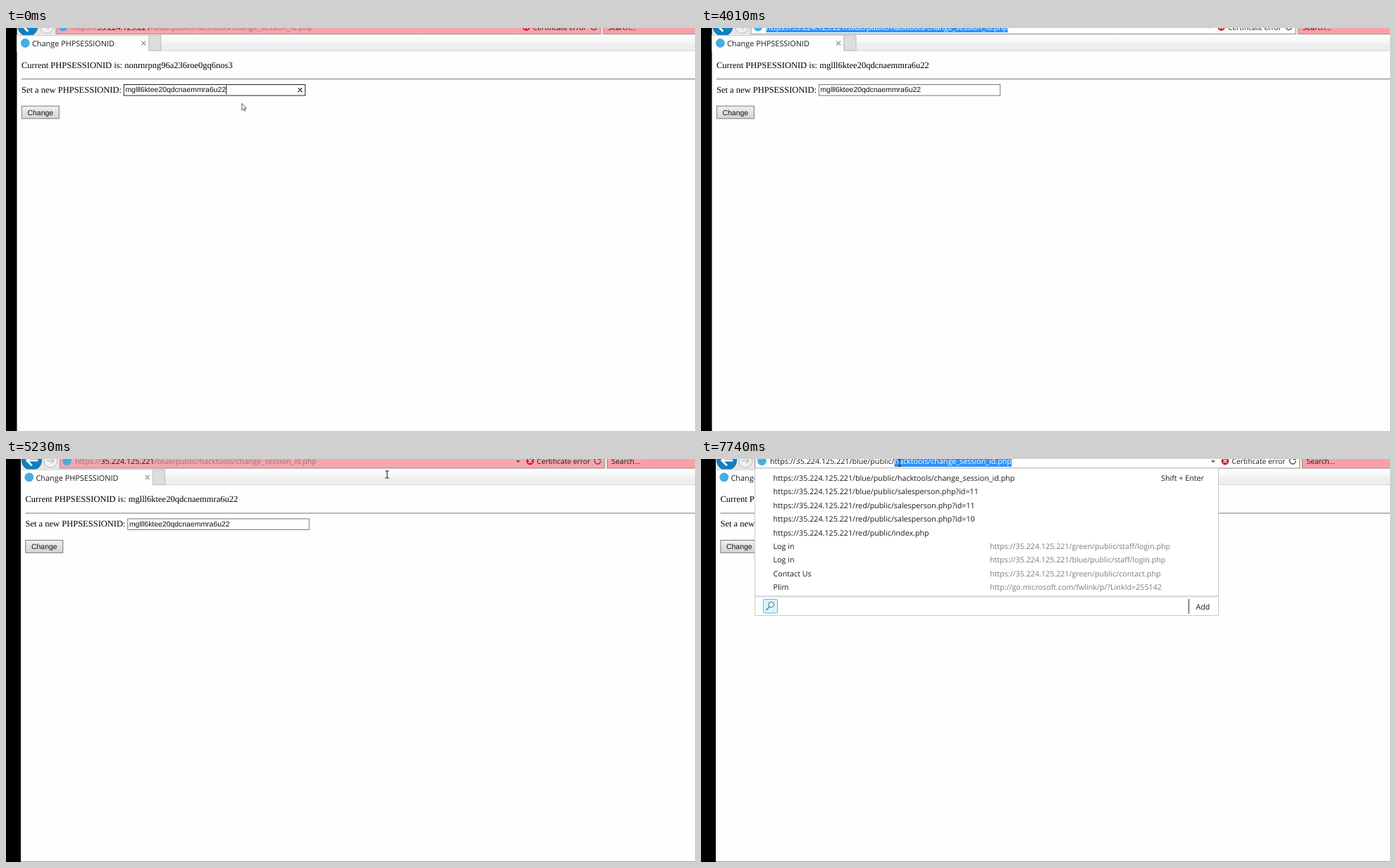
Recreate the animation shown at these times as an HTML page. Size 978x573 px, loop 8000 ms.

```html
<!DOCTYPE html>
<html lang="en">
<head>
<meta charset="utf-8">
<title>Change PHPSESSIONID</title>
<style>
  html, body { margin: 0; width: 100%; height: 100%; overflow: hidden; background: #000; }
  svg { display: block; width: 978px; height: 573px; }
  text { font: 10.72px "Open Sans", "Noto Sans", sans-serif; fill: #1a1a1a; text-rendering: geometricPrecision; white-space: pre; }
  text.serif { font: 12.5px "Liberation Serif", serif; fill: #000; }
  text.field { font: 10.45px "Liberation Sans", sans-serif; fill: #111; }
  text.small { font-size: 10.3px; }
  text.link { fill: #7c7c7c; }
  .dim { fill: #9a7379; }
  .focused .dim { fill: #1a1a1a; }
  .bar { fill: #f7a5af; }
  .focused .bar { fill: #fff; }
  .hidden { display: none; }
  .line { fill: none; stroke-linecap: round; stroke-linejoin: round; }
</style>
</head>
<body>
<svg viewBox="0 0 978 573">
  <defs>
    <linearGradient id="stripFill" x2="0" y2="1">
      <stop offset="0" stop-color="#fdfdfd"/><stop offset=".45" stop-color="#f6f6f6"/>
      <stop offset=".55" stop-color="#efefef"/><stop offset="1" stop-color="#ececec"/>
    </linearGradient>
    <linearGradient id="buttonFill" x2="0" y2="1">
      <stop offset="0" stop-color="#f0f0f0"/><stop offset="1" stop-color="#d4d4d4"/>
    </linearGradient>
    <clipPath id="selectionClip"><rect id="selection" y="13" width="0" height="16"/></clipPath>
  </defs>

  <rect width="978" height="573"/>
  <g id="view">
    <rect x="21" width="1000" height="56" fill="#e6e6e6"/>
    <rect id="strip" x="21" y="32" width="1000" height="23" fill="url(#stripFill)"/>
    <rect x="21" y="55" width="1000" height="600" fill="#fefefe"/>
    <path d="M208 54.8H1000" stroke="#d9d9d9"/>

    <!-- navigation -->
    <circle cx="36.5" cy="20" r="14" fill="#1180c0" stroke="#0b6ba4"/>
    <path class="line" d="M44 20H30M36 13.5L29.5 20L36 26.5" stroke="#fff" stroke-width="2.8"/>
    <circle cx="63.3" cy="20.5" r="9.5" fill="#f1f1f1" stroke="#b9b9b9"/>
    <path class="line" d="M58.5 20.5H68M64.5 17L68 20.5L64.5 24" stroke="#bdbdbd" stroke-width="1.4"/>

    <!-- address bar -->
    <g id="address">
      <rect class="bar" x="76.5" y="10.5" width="773" height="20.5" stroke="#a9888c"/>
      <circle cx="86.5" cy="20.7" r="6.3" fill="#45aee2"/>
      <text x="98" y="25" id="url"><tspan class="dim">https://</tspan>35.224.125.221<tspan class="dim">/blue/public/hacktools/change_session_id.php</tspan></text>
      <g clip-path="url(#selectionClip)">
        <rect x="90" y="13" width="400" height="16" fill="#2f92f7"/>
        <text x="98" y="25" style="fill:#fff">https://35.224.125.221/blue/public/hacktools/change_session_id.php</text>
      </g>
      <path id="urlCaret" d="M441.5 14V29" stroke="#222"/>
      <path d="M724 20h6l-3 3.2z" fill="#555"/>
      <circle cx="744" cy="21" r="5.4" fill="#cf1f2b"/>
      <path class="line" d="M742 19l4 4m0-4l-4 4" stroke="#fff" stroke-width="1.5"/>
      <text class="small" x="753.5" y="25">Certificate error</text>
      <path class="line" d="M843 17.6A4.4 4.4 0 1 0 844.2 21M844 15.5V18.6H841" stroke="#5c4d50" stroke-width="1.4"/>
    </g>
    <rect x="853.5" y="10.5" width="200" height="20.5" fill="#fb9fa9" stroke="#a9888c"/>
    <text class="small" x="859.5" y="25">Search...</text>

    <!-- tab -->
    <path d="M21 33H208.5V56H21z" fill="#fefefe"/>
    <path class="line" d="M21 33H208.5V55" stroke="#c6c6c6"/>
    <rect x="208.5" y="33" width="17" height="21.5" fill="#dddddd" stroke="#bcbcbc"/>
    <circle cx="32.8" cy="44" r="6.4" fill="#45aee2"/>
    <text x="42.5" y="48.6" style="font-size:10.9px">Change PHPSESSIONID</text>
    <path class="line" d="M198 41.5l5.4 5.4m0-5.4l-5.4 5.4" stroke="#8c8c8c" stroke-width="1.1"/>

    <!-- page -->
    <text class="serif" x="27.5" y="79">Current PHPSESSIONID is: <tspan id="current"></tspan></text>
    <rect x="27.5" y="94.5" width="1000" height="1.1" fill="#858085"/>
    <text class="serif" x="27.5" y="114">Set a new PHPSESSIONID:</text>
    <rect id="input" x="172.8" y="103" width="257.4" height="15.5" fill="#fff"/>
    <text class="field" x="174.9" y="113.8">mglll6ktee20qdcnaemmra6u22</text>
    <g id="inputFocus" class="line" stroke="#111">
      <path d="M318.2 104.5V116.5"/>
      <path d="M420.6 108.2l4.8 4.8m0-4.8l-4.8 4.8" stroke-width="1.2"/>
    </g>
    <rect x="27.8" y="133.5" width="53" height="17.8" fill="url(#buttonFill)" stroke="#7a7a7a"/>
    <text class="field" x="36" y="146">Change</text>

    <!-- suggestions -->
    <g id="menu">
      <rect x="76.5" y="31" width="658" height="209.5" fill="#fff" stroke="#c9c9c9"/>
      <g id="rows"></g>
      <text x="653" y="49">Shift + Enter</text>
      <rect x="77" y="212" width="657" height="2.6" fill="#dedede"/>
      <rect x="88.5" y="217.5" width="20" height="19.5" rx="1" fill="#d8f3fc" stroke="#55bcdc"/>
      <circle cx="99.8" cy="225" r="3.7" fill="#eefaff" stroke="#6c7c90" stroke-width="1.2"/>
      <path class="line" d="M97 228l-4 4.5" stroke="#6c7c90" stroke-width="1.7"/>
      <path d="M692.5 217V238" stroke="#333"/>
      <text x="702.5" y="232">Add</text>
    </g>
    <path id="bottomEdge" d="M21 590.4H1000" stroke="#9d9d9d"/>
  </g>

  <path id="arrow" d="M.5 .3V9.8L2.6 7.9L4 11L5.4 10.4L4 7.3H7z" fill="#fff" stroke="#333" stroke-width=".8"/>
  <path id="beam" class="line" d="M-2.2 -5H-.6L0 -4.5L.6 -5H2.2M0 -4.5V4.5M-2.2 5H-.6L0 4.5L.6 5H2.2" stroke="#222" stroke-width="1.1"/>
</svg>

<script>
const LOOP = 8000, URL_LEFT = 98;
const $ = id => document.getElementById(id);
const within = (t, start, end) => t >= start && t < end;
const show = (id, on) => $(id).classList.toggle('hidden', !on);
const place = (id, [x, y]) => $(id).setAttribute('transform', `translate(${x} ${y})`);

// Each entry is [time, x, y], held until the next one.
const arrowPath = [
  [0, 334.3, 107], [120, 216, 145], [430, 130, 150], [550, 75, 134], [690, 57.3, 122],
  [1390, 171, 150], [1510, 265, 222], [1670, 420, 283], [1830, 543, 268], [2000, 537, 180],
  [2160, 510, 92], [2320, 478, 32], [2490, 461, 8.5], [2640, 460.6, 0], [2760, -50, 0]
];
const beamPath = [
  [0, -50, 0], [2760, 463, 2], [3860, 460, 0], [4010, -50, 0], [5170, 541, 22], [5320, 541, 6],
  [6860, 478, 13], [7010, 428, 15], [7160, 358, 12], [7310, 305, 8], [7460, 282, 5.5]
];
const viewPath = [
  [0, -5.5, -22.5], [4440, -3, -11], [4560, 0, 0], [4870, 0, -9], [5020, 0, -18]
];
const at = (path, t) => path.findLast(key => key[0] <= t).slice(1);

const host = 'https://35.224.125.221/';
const suggestions = [
  [host + 'blue/public/hacktools/change_session_id.php'],
  [host + 'blue/public/salesperson.php?id=11'],
  [host + 'red/public/salesperson.php?id=11'],
  [host + 'red/public/salesperson.php?id=10'],
  [host + 'red/public/index.php'],
  ['Log in', host + 'green/public/staff/login.php'],
  ['Log in', host + 'blue/public/staff/login.php'],
  ['Contact Us', host + 'green/public/contact.php'],
  ['Plim', 'http://go.microsoft.com/fwlink/p/?LinkId=255142']
];
$('rows').innerHTML = suggestions.map(([label, link = ''], i) => {
  const y = 49 + 19.38 * i;
  return `<text x="102.5" y="${y}">${label}</text><text class="link" x="410" y="${y}">${link}</text>`;
}).join('');

const prefixLength = (host + 'blue/public/').length;

function selectionStart(t, end) {
  if (within(t, 2900, 4440) || within(t, 5320, 6020)) return URL_LEFT;
  if (t >= 7460) return URL_LEFT + $('url').getSubStringLength(0, prefixLength);
  if (t >= 6860) return Math.min(end, at(beamPath, t)[0]);
  return end;
}

function draw(t) {
  place('view', at(viewPath, t));
  place('arrow', at(arrowPath, t));
  place('beam', at(beamPath, t));

  const editing = t < 820;
  show('inputFocus', editing);
  $('input').setAttribute('stroke', editing ? '#222' : '#777');
  $('current').textContent = t < 1100 ? 'nonrnrpng96a236roe0gq6nos3' : 'mglll6ktee20qdcnaemmra6u22';

  $('address').classList.toggle('focused', within(t, 2900, 4440) || t >= 5320);
  const end = URL_LEFT + $('url').getComputedTextLength();
  const start = selectionStart(t, end);
  $('selection').setAttribute('x', start);
  $('selection').setAttribute('width', end - start);

  show('urlCaret', within(t, 6430, 6580));
  show('strip', !within(t, 4440, 4870));
  show('bottomEdge', t >= 5020);
  show('menu', t >= 7740);
}

function frame() {
  draw(performance.now() % LOOP);
  requestAnimationFrame(frame);
}
frame();
</script>
</body>
</html>
```
